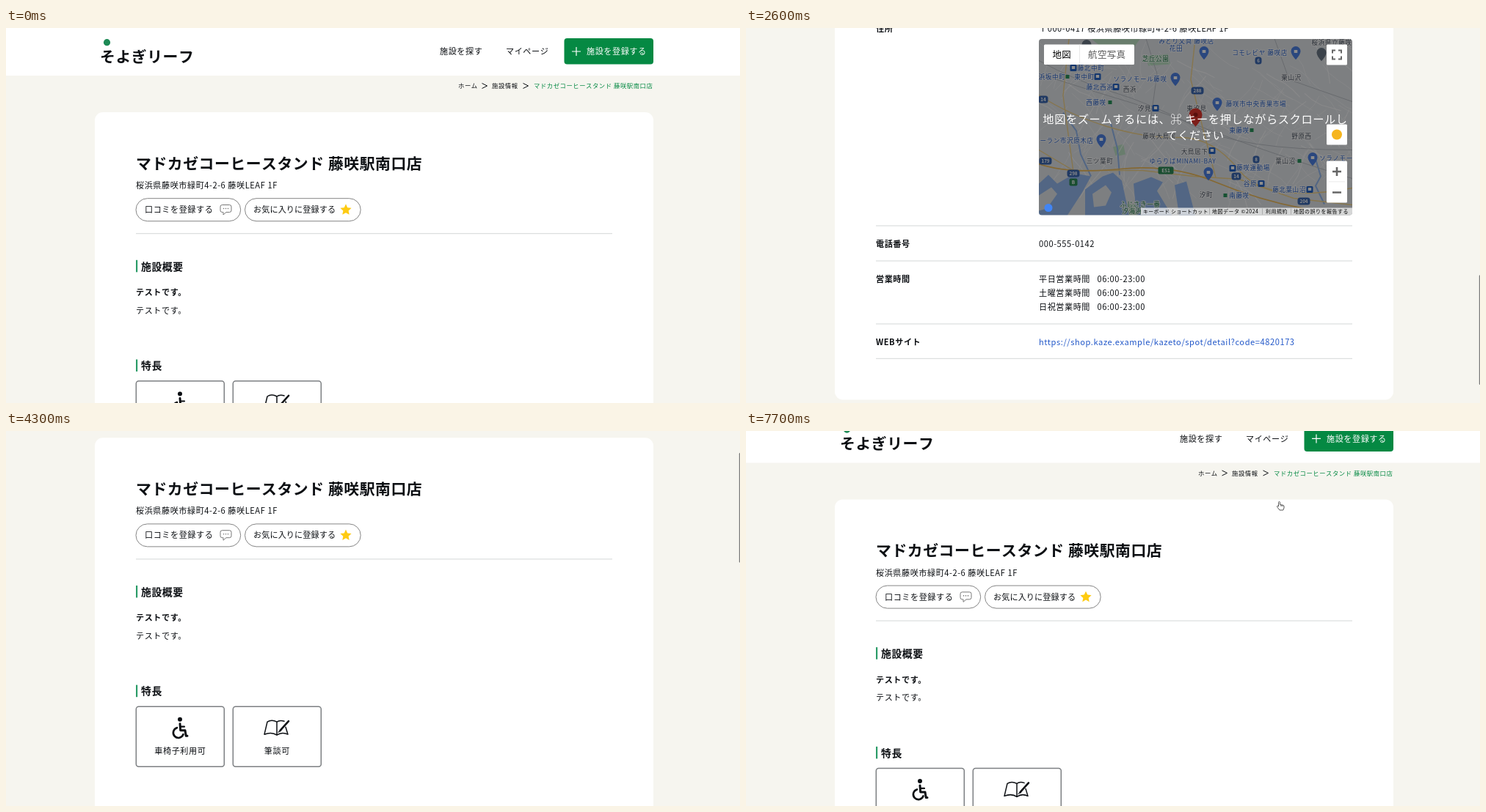
An HTML page with a canvas for the animation above (8 s loop, 1000 by 512 pixels).

```html
<!DOCTYPE html>
<html lang="ja">
<head>
<meta charset="utf-8">
<title>施設ページ</title>
<style>
html, body { margin: 0; width: 100%; height: 100%; overflow: hidden; background: #fff; }
canvas { display: block; width: 1000px; height: 512px; }
</style>
</head>
<body>
<canvas id="stage" width="1000" height="512"></canvas>
<script>
const ctx = document.getElementById('stage').getContext('2d');
const FONT = '"Noto Sans CJK JP", "Noto Sans CJK", "Noto Sans JP", sans-serif';
const LOOP = 8000, STEP = 100, GAP = 0.556;
const INK = '#0c0f13', GREEN = '#058943', BLUE = '#2a62c8';
const BASE = 11.11, SMALL = 8.33, HEAD = 13.89, BIG = 20.83;
const SITE = 'そよぎリーフ';
const SHOP = 'マドカゼコーヒースタンド 藤咲駅南口店';
const ADDRESS = '桜浜県藤咲市緑町4-2-6 藤咲LEAF 1F';

// [time, value] pairs, linear between neighbours
const SCROLL = [[600, 0], [800, 34], [1000, 75], [1300, 75], [1600, 330], [1800, 430], [1900, 430],
  [2200, 762], [2500, 1130], [2800, 1340], [3100, 1394.5], [3400, 1220], [3700, 1000.5],
  [3900, 760], [4200, 190], [4400, 21.6]];
const FORM_SCROLL = [[5900, 0], [6100, 120], [6300, 198], [6700, 198], [7000, 0]];

function track(keys, t) {
  if (t <= keys[0][0]) return keys[0][1];
  for (let i = 1; i < keys.length; i++) {
    const [t0, a] = keys[i - 1], [t1, b] = keys[i];
    if (t <= t1) return a + (b - a) * (t - t0) / (t1 - t0);
  }
  return keys[keys.length - 1][1];
}
const clamp = v => Math.max(0, Math.min(1, v));

// Text placed by the middle of the ideographic box
function text(str, x, cy, { size = BASE, weight = 500, color = INK, align = 'left', gap = GAP } = {}) {
  ctx.font = `${weight} ${size}px ${FONT}`;
  ctx.letterSpacing = gap + 'px';
  ctx.textAlign = align;
  ctx.fillStyle = color;
  ctx.fillText(str, x, cy + size * 0.38);
}
const bold = (str, x, cy, opt = {}) => text(str, x, cy, { weight: 700, ...opt });

function rect(x, y, w, h, color) {
  ctx.fillStyle = color;
  ctx.fillRect(x, y, w, h);
}
function box(x, y, w, h, r, fill, stroke, width = 1) {
  ctx.beginPath();
  ctx.roundRect(x, y, w, h, r);
  if (fill) { ctx.fillStyle = fill; ctx.fill(); }
  if (stroke) { ctx.strokeStyle = stroke; ctx.lineWidth = width; ctx.stroke(); }
}
function dot(x, y, r, color) {
  ctx.fillStyle = color;
  ctx.beginPath();
  ctx.arc(x, y, r, 0, 7);
  ctx.fill();
}
function path(d, stroke, width = 1, fill) {
  const p = new Path2D(d);
  if (fill) { ctx.fillStyle = fill; ctx.fill(p); }
  if (stroke) { ctx.strokeStyle = stroke; ctx.lineWidth = width; ctx.stroke(p); }
}
function at(x, y, draw) {
  ctx.save();
  ctx.translate(x, y);
  draw();
  ctx.restore();
}
const rule = y => rect(177, y - 0.5, 649, 1, '#d4d7d7');

function heading(str, cy) {
  rect(177, cy - 8.5, 2.2, 16.5, '#2c9c68');
  bold(str, 184, cy, { size: HEAD });
}
function logo(x, cy) {
  dot(x + 9.5, cy - 19.3, 4.6, '#1d8a55');
  bold(SITE, x, cy, { size: BIG });
}

function header() {
  rect(0, 0, 1000, 65, '#fff');
  logo(128, 39);
  text('施設を探す', 591, 32);
  text('マイページ', 681, 32);
  box(760.5, 14, 121.5, 35.5, 4, GREEN);
  path('M771 32H783M777 26V38', '#fff', 1.2);
  text('施設を登録する', 791, 32, { color: '#fff' });
  const crumb = { size: SMALL };
  text('ホーム', 616, 79, crumb);
  text('施設情報', 662, 79, crumb);
  for (const x of [648.5, 704.5]) path(`M${x} 75.5L${x + 7} 79L${x} 82.5`, INK, 1);
  text(SHOP, 719, 79, { size: SMALL, color: GREEN });
}

function star(x, y, r) {
  ctx.fillStyle = '#fecb12';
  ctx.beginPath();
  for (let i = 0; i < 10; i++) {
    const a = i * Math.PI / 5 - Math.PI / 2, q = i % 2 ? r * 0.48 : r;
    ctx.lineTo(x + q * Math.cos(a), y + q * Math.sin(a));
  }
  ctx.closePath();
  ctx.fill();
}

function intro() {
  bold(SHOP, 177, 185, { size: BIG });
  text(ADDRESS, 177, 215);
  box(177, 232.7, 142.7, 31, 15.5, '#fff', '#858585');
  box(325.5, 232.7, 157.7, 31, 15.5, '#fff', '#858585');
  text('口コミを登録する', 189, 248);
  path('M294.5 241.5H304.5Q307 241.5 307 244V249Q307 251.5 304.5 251.5H300L296 255V251.5H294.5Q292 251.5 292 249V244Q292 241.5 294.5 241.5Z', '#777', 1);
  for (const x of [296.5, 299.5, 302.5]) dot(x, 246.5, 0.8, '#777');
  text('お気に入りに登録する', 337, 248, { gap: 0.1 });
  star(463, 248.3, 8);
  rule(280.7);
  heading('施設概要', 325.3);
  bold('テストです。', 177, 361);
  text('テストです。', 177, 385.7);
  heading('特長', 461);
  box(177.3, 482, 120, 82, 3.5, '#fff', '#7c7f82', 1.5);
  box(309.3, 482, 120, 82, 3.5, '#fff', '#7c7f82', 1.5);
  text('車椅子利用可', 237.3, 543, { align: 'center' });
  text('筆談可', 369.3, 543, { align: 'center' });
  ctx.lineCap = ctx.lineJoin = 'round';
  at(237, 511, () => {
    dot(0, -11.5, 3, INK);
    path('M0 -5.5L0.7 3.5H7L8.2 11H10', INK, 3);
    path('M1 -1.5H6', INK, 2.2);
    path('M-4 0A7 7 0 1 0 4.5 9', INK, 2.6);
  });
  at(369, 511, () => {
    path('M0 -8Q-7 -12 -13 -8L-17 9Q-7 5 0 10Q7 5 15 9L12 -1M0 -8Q4 -11 10 -9M0 -8V9', INK, 1.5);
    path('M16 -9L7 1L4.5 4', INK, 2.6);
    path('M4.5 4L2 6', INK, 1.2);
  });
  ctx.lineCap = 'butt';
  ctx.lineJoin = 'miter';
}

function review() {
  heading('口コミ', 796);
  dot(196.5, 852.5, 20, '#f8f8f9');
  ctx.strokeStyle = '#c6cdd4';
  ctx.lineWidth = 1.5;
  ctx.beginPath();
  ctx.arc(196.3, 845.5, 4.8, 0, 7);
  ctx.stroke();
  path('M187 864Q187 853.5 196.3 853.5Q205.6 853.5 205.6 864Z', '#c6cdd4', 1.5);
  bold('サンプル葵', 233, 843);
  text('2024-02-24', 233, 862.5, { size: 9.72 });
  bold('高齢の方の注文を店員さんが席まで運んでいた', 233, 889.5);
  [
    'ここのマドカゼは注文したあとに番号札が渡されて、注文したものが完成したタイミングで呼び出しをしてくれ',
    'ます。',
    '',
    '声だけでなく、モニターがあるため聞きづらさを持つユーザーであっても視覚で完成のタイミングを知ることが',
    'できました。',
    'また、高齢の方や足の不自由な方には店員さんが直接席まで料理を運んでいるのを目にして、とても安心して利',
    '用できる店舗だと感じました。'
  ].forEach((line, i) => text(line, 233, 908.5 + 19 * i));
}

const PLACES = [
  ['みどり文具 藤咲店', 600, 217], ['コモレビヤ 藤咲店', 700, 233], ['ソラノモール藤咲', 537, 269],
  ['藤北中町', 470, 254], ['浜坂中町', 417, 266], ['東中町', 461, 266], ['藤北西浜', 482, 280],
  ['藤咲市中央青果市場', 695, 303], ['ーラン市沢原木店', 437, 353], ['ソラノモー', 804, 377],
  ['ゆらりばMINAMI-BAY', 595, 381], ['藤咲運動場', 691, 390], ['藤北葉山沼', 740, 420],
  ['西藤咲', 477, 301], ['花田', 586, 227], ['東藤咲', 672, 339], ['南藤咲', 672, 428], ['谷原', 687, 412]
];
const TOWNS = [
  ['桜浜県立藤咲', 798, 219], ['栗山沢', 743, 267], ['西浜', 523, 283], ['汐見', 543, 309],
  ['東汐見', 614, 309], ['三ツ葉町', 482, 381], ['大鳥居下', 611, 368], ['藤咲大鳥居', 563, 347],
  ['野原西', 757, 347], ['葉山沼', 735, 381], ['汐町', 627, 427]
];
const ROUTES = [['14', 405, 297], ['288', 615, 285], ['6', 698, 244], ['179', 408, 381],
  ['298', 446, 398], ['14', 668, 402], ['8', 695, 379], ['204', 760, 436]];
const PINS = [[624, 231], [749, 231], [585, 267], [642, 301], [484, 351], [772, 376], [630, 396]];
const STATIONS = [[446, 254], [479, 266], [504, 280], [558, 309], [635, 367], [663, 391], [702, 412], [768, 420]];
const LINES = [[438, 266], [496, 301], [689, 339], [754, 381], [653, 428]];

function pin(x, y, color, r = 6.5) {
  path(`M${x - r} ${y}A${r} ${r} 0 1 1 ${x + r} ${y}Q${x + r} ${y + r * 0.7} ${x} ${y + r * 1.8}Q${x - r} ${y + r * 0.7} ${x - r} ${y}Z`, null, 0, color);
}
function mapLabel(str, x, y, color) {
  ctx.font = `500 8.6px ${FONT}`;
  ctx.letterSpacing = GAP + 'px';
  ctx.textAlign = 'center';
  ctx.strokeStyle = 'rgba(255,255,255,.8)';
  ctx.lineWidth = 2;
  ctx.lineJoin = 'round';
  ctx.strokeText(str, x, y + 3.3);
  text(str, x, y, { size: 8.6, color, align: 'center' });
  ctx.lineJoin = 'miter';
}

function streets() {
  let seed = 11;
  const rnd = () => (seed = seed * 16807 % 2147483647) / 2147483647;
  ctx.strokeStyle = 'rgba(255,255,255,.7)';
  for (let i = 0; i < 150; i++) {
    let x = 399 + rnd() * 427, y = 215 + rnd() * 195;
    let a = (rnd() < 0.5 ? 0.4 : 1.9) + rnd() * 0.6;
    ctx.lineWidth = i % 4 ? 0.7 : 1.1;
    ctx.beginPath();
    ctx.moveTo(x, y);
    for (let k = 0; k < 4; k++) {
      x += Math.cos(a) * 14;
      y += Math.sin(a) * 14;
      a += rnd() * 0.6 - 0.3;
      ctx.lineTo(x, y);
    }
    ctx.stroke();
  }
}

function mapGround() {
  rect(399, 214, 427, 241, '#e3e6ea');
  path('M470 214H537L528 227L490 230ZM545 238L575 235L578 249L548 251ZM500 362L514 358L517 372L504 375ZM510 440H545V455H512Z', null, 0, '#bfe3c6');
  streets();
  // harbour basins and canals between the piers
  path('M399 412L412 400L424 412L448 398L470 402L458 424L438 455H399ZM462 420L486 402L500 397L512 408L522 455H462ZM528 412L552 403L568 410L560 422L580 455H532ZM584 414L600 409L612 455H590Z', null, 0, '#94b9f0');
  path('M399 428L416 417L424 426L410 446L399 449ZM472 426L490 414L498 424L490 442L474 444Z', null, 0, '#e3e6ea');
  path('M432 315L450 340L456 372L470 402M497 330L506 364L509 400M775 375L783 402L776 415L788 440', '#94b9f0', 2);
  path('M399 244Q450 272 500 287T612 334T826 366M399 262Q470 285 520 300T640 342T826 405M545 214L560 262L552 320M720 214L740 270L826 300', '#bcc1c7', 1);
  path('M399 291Q440 318 492 334T590 349T672 394T826 418M399 366L446 394L540 394L610 402L672 406L746 432L826 441M612 214L606 270L622 335L640 404M440 214L432 292L446 396', '#f3d58c', 1.4);
  path('M399 385Q440 399 510 392T640 410T760 446', '#f0bd5c', 1.7);
}

function mapDetail() {
  for (const [s, x, y] of TOWNS) mapLabel(s, x, y, '#4b5563');
  for (const [s, x, y] of PLACES) mapLabel(s, x, y, BLUE);
  mapLabel('芝丘公園', 558, 241, '#23804a');
  mapLabel('ふじさき一番', 537, 440, '#23804a');
  mapLabel('汐海浜', 526, 449, '#23804a');
  for (const [x, y] of STATIONS) {
    box(x - 4.5, y - 4.5, 9, 9, 1.5, '#2464c8');
    rect(x - 2.2, y - 2.5, 4.4, 4, '#fff');
  }
  for (const [x, y] of LINES) rect(x - 2.5, y - 2.5, 5, 5, '#28935a');
  for (const [s, x, y] of ROUTES) {
    const w = s.length * 4 + 5;
    box(x - w / 2, y - 5, w, 10, 3.5, '#3c69b4');
    bold(s, x, y, { size: 6.3, color: '#fff', align: 'center', gap: 0 });
  }
  for (const [s, x, y] of [['E51', 572, 394], ['B', 446, 410]]) {
    box(x - s.length * 2.5 - 3, y - 5, s.length * 5 + 6, 10, 2, '#2d8b57');
    bold(s, x, y, { size: 6.5, color: '#fff', align: 'center', gap: 0 });
  }
  for (const [x, y] of PINS) {
    pin(x, y, '#4d80e4');
    rect(x - 2.3, y - 1.5, 4.6, 4, '#fff');
  }
  pin(784, 233, '#6b7886');
  pin(464, 222, '#6b7886');
  pin(612.5, 318, '#e3372d', 9);
  dot(612.5, 318, 3, '#9f1d18');
}

function mapControls() {
  box(406, 222, 123, 27.5, 1.5, '#fff');
  rect(454, 222, 0.8, 27.5, '#e4e4e4');
  text('地図', 430.3, 236, { size: 12.5, color: '#000', align: 'center', gap: 0.3 });
  text('航空写真', 491.7, 236, { size: 12.5, weight: 400, color: '#565656', align: 'center', gap: 0.3 });
  for (const [y, h] of [[222, 28], [331, 28], [381, 57]]) box(791, y, 28, h, 1.5, '#fff');
  path('M799 234V230H803M807 230H811V234M811 238V242H807M803 242H799V238', '#666', 2);
  dot(805, 345, 7, '#f6b51e');
  path('M799 395.5H811M805 389.5V401.5M799 424H811', '#666', 2.6);
  rect(794, 409, 22, 0.8, '#e4e4e4');
  dot(412, 445, 5.5, '#4285f4');
  rect(538, 445, 288, 10, 'rgba(245,245,245,.75)');
  const tiny = { size: 6.94, color: '#000' };
  text('キーボード ショートカット', 541, 450, { ...tiny, gap: 0.3 });
  text('地図データ ©2024', 635, 450, tiny);
  text('利用規約', 708, 450, tiny);
  text('地図の誤りを報告する', 746, 450, tiny);
  for (const x of [631, 703, 742]) rect(x, 446, 0.7, 8, '#999');
}

function areaMap(shade) {
  ctx.save();
  ctx.translate(0, 1000.5);
  ctx.beginPath();
  ctx.roundRect(399, 214.5, 427, 240.5, 4);
  ctx.clip();
  mapGround();
  mapDetail();
  if (shade) {
    ctx.globalAlpha = shade;
    rect(399, 214, 427, 242, 'rgba(0,0,0,.45)');
    const note = { size: 15.28, color: '#fff', align: 'center' };
    text('地図をズームするには、⌘ キーを押しながらスクロールし', 612, 323.5, note);
    text('てください', 612, 346, note);
    ctx.globalAlpha = 1;
  }
  mapControls();
  ctx.restore();
}

function details(shade) {
  const col = 399;
  heading('施設の情報', 1114.3);
  bold('施設の名前', 177, 1153.5);
  text(SHOP, col, 1153.5);
  rule(1176);
  bold('住所', 177, 1201);
  text('〒000-0417 ' + ADDRESS, col, 1201);
  areaMap(shade);
  rule(1470);
  bold('電話番号', 177, 1494.3);
  text('000-555-0142', col, 1494.3);
  rule(1518);
  bold('営業時間', 177, 1542.5);
  ['平日', '土曜', '日祝'].forEach((day, i) => {
    text(day + '営業時間', col, 1542.5 + 19 * i);
    text('06:00-23:00', 478.5, 1542.5 + 19 * i);
  });
  rule(1604);
  bold('WEBサイト', 177, 1628.3);
  text('https://shop.kaze.example/kazeto/spot/detail?code=4820173', col, 1628.3, { color: '#2459c9' });
  rule(1651.3);
}

function footer() {
  rect(0, 1730.5, 1000, 144, '#fafafc');
  rect(0, 1874.5, 1000, 100, '#fff');
  logo(119.5, 1793);
  ['ホーム', '施設を探す', 'プライバシーポリシー', '利用規約']
    .forEach((s, i) => text(s, 765, 1779 + 27.5 * i));
}

function page(scroll, shade) {
  rect(0, 0, 1000, 512, '#f6f5ef');
  at(0, -scroll, () => {
    box(121, 115, 761, 1592.5, 11, '#fff');
    header();
    intro();
    review();
    details(shade);
    footer();
  });
}

function field(label, cy, top, h) {
  bold(label, 272, cy);
  box(324, cy - 8.5, 30, 17, 1.5, '#dc2328');
  bold('必須', 339.3, cy, { size: SMALL, color: '#fff', align: 'center' });
  box(272.3, top, 458, h, 4, '#fff', '#858585', 1.5);
}

function form(scroll, alpha, bar) {
  ctx.save();
  ctx.globalAlpha = alpha;
  rect(0, 0, 1000, 512, 'rgba(0,0,0,.6)');
  box(244, 53, 514.5, 435, 4, '#fff');
  ctx.clip();
  at(0, -scroll, () => {
    bold('口コミを登録する', 501.3, 90.5, { align: 'center' });
    ctx.strokeStyle = '#111';
    ctx.lineWidth = 1;
    ctx.beginPath();
    ctx.arc(722.2, 89, 19.3, 0, 7);
    ctx.stroke();
    path('M718.7 80L725.7 87M725.7 80L718.7 87', '#111', 1);
    text('閉じる', 722.3, 95, { size: SMALL, align: 'center' });
    field('タイトル', 137.3, 153, 43);
    field('コメント', 234, 249.5, 222.5);
    path('M722.5 470L728.5 464M726 470L728.5 467.5', '#777', 0.8);
  });
  if (bar) box(750, 55 + scroll * 0.672, 6, 297, 3, 'rgba(0,0,0,.5)');
  ctx.restore();
}

function arrow(x, y) {
  at(x, y, () => path('M0.5 0.5V10L2.6 8.1L4.2 11.6L5.9 10.8L4.3 7.5H7Z', '#fff', 0.8, '#222'));
}
function hand(x, y) {
  at(x, y, () => path('M2.5 7V1.5Q2.5 0.5 3.5 0.5Q4.5 0.5 4.5 1.5V4.5L8.5 5.2Q10 5.5 10 7V9L8.8 12H4L0.6 7.6Q0.2 6.5 1.2 6.2ZM6 5V7M8 5.3V7', '#444', 0.9, '#fff'));
}
function cursor(t) {
  if (t < 200) return;
  if (t < 300) arrow(512, 441);
  else if (t < 1400) arrow(513.5, 396.5);
  else if (t < 4900) return;
  else if (t < 5600) hand(262, 215);
  else if (t < 5700) arrow(500, 186);
  else if (t < 7200) arrow(750, 154.5);
  else if (t < 7300) arrow(741, 138);
  else if (t < 7400) arrow(729, 120);
  else if (t < 7500) hand(714, 102);
  else hand(723, 96);
}

function draw(t) {
  const scroll = track(SCROLL, t);
  page(scroll, t < 4600 ? clamp((t - 2200) / 300) : 0);
  if (t >= 700 && t < 5200) box(998.8, scroll * 0.281, 3, 150, 1.5, '#7a7a7a');
  if (t >= 5200 && t < 7700) {
    const bar = (t >= 6000 && t < 6500) || (t >= 6800 && t < 7200);
    form(track(FORM_SCROLL, t), clamp((t - 5100) / 300), bar);
  }
  cursor(t);
}

const start = performance.now();
function tick() {
  const t = (performance.now() - start) % LOOP;
  draw(Math.floor(t / STEP) * STEP);
  requestAnimationFrame(tick);
}
tick();
</script>
</body>
</html>
```
